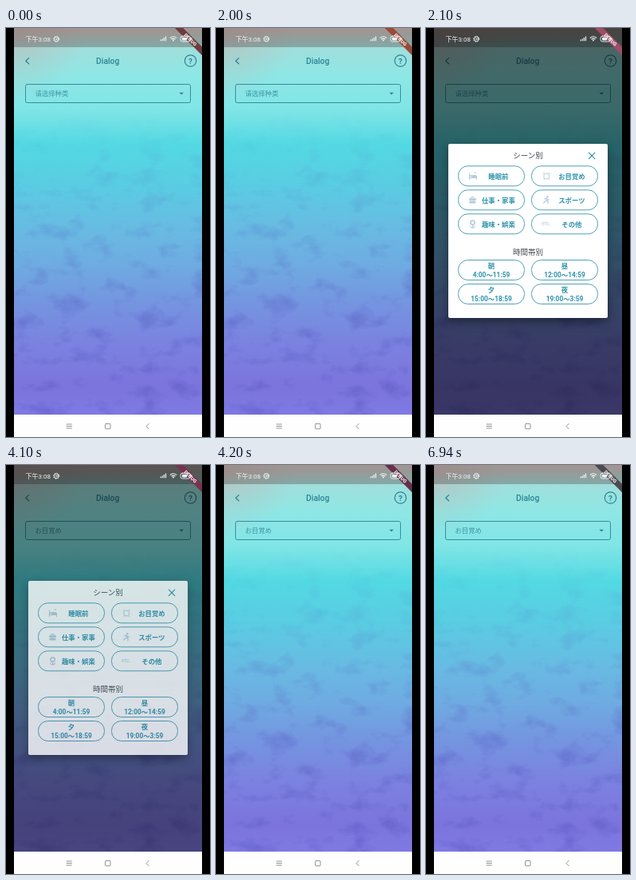
Animation, 256 px wide and 512 px high, one loop 7.7 s. Source, as an HTML page:

```html
<!DOCTYPE html>
<html lang="ja">
<head>
<meta charset="utf-8">
<title>Dialog</title>
<style>
html, body { margin: 0; width: 100%; height: 100%; overflow: hidden; background: #000; }
svg { display: block; width: 100vw; height: 100vh; }
text { font-family: Roboto, "Noto Sans CJK JP", "Noto Sans CJK", sans-serif; text-anchor: middle; }
.zh { font-family: Roboto, "Noto Sans CJK SC", "Noto Sans CJK", sans-serif; }
.start { text-anchor: start; }
.line { fill: none; stroke-linecap: round; stroke-linejoin: round; }
.head { font-size: 9.5px; font-weight: 500; fill: #3f484c; }
.pill { fill: #fff; stroke: #3b97b2; stroke-width: .9; }
.label { font-size: 8.4px; font-weight: 700; fill: #2f93ad; }
.icon { fill: none; stroke: #b3ccd8; stroke-width: 1; }
.icon .solid { fill: #b3ccd8; stroke: none; }
.dialog { filter: drop-shadow(0 5px 6px rgba(0, 0, 0, .38)); }

/* 2000, 2100, 4100, 4200 and 5800 ms of a 7700 ms loop */
.scrim, .dialog, .before, .after, .ribbon { animation: 7.7s step-end infinite; }
.scrim { animation-name: scrim; }
.dialog { animation-name: dialog; }
.before { animation-name: before; }
.after { animation-name: after; }
.ribbon { animation-name: ribbon; }
@keyframes scrim { 0% { opacity: 0 } 27.2727% { opacity: .54 } 53.2468% { opacity: .44 } 54.5455%, 100% { opacity: 0 } }
@keyframes dialog { 0% { opacity: 0 } 27.2727% { opacity: 1 } 53.2468% { opacity: .8 } 54.5455%, 100% { opacity: 0 } }
@keyframes before { 0% { opacity: 1 } 53.2468%, 100% { opacity: 0 } }
@keyframes after { 0% { opacity: 0 } 53.2468%, 100% { opacity: 1 } }
@keyframes ribbon {
  0% { fill: #6c3c3e }
  25.974% { fill: #9a4a38 }
  27.2727% { fill: #a04c66 }
  53.2468% { fill: #78324e }
  54.5455% { fill: #66304a }
  75.3247%, 100% { fill: #4c4a4e }
}
</style>
</head>
<body>
<svg viewBox="0 0 256 512" preserveAspectRatio="none">
  <defs>
    <linearGradient id="sky" gradientUnits="userSpaceOnUse" x1="0" y1="0" x2="0" y2="484">
      <stop offset="0" stop-color="#d2bdb9"/>
      <stop offset=".03" stop-color="#b8ccc9"/>
      <stop offset=".055" stop-color="#9fdfdc"/>
      <stop offset=".12" stop-color="#8ee7e5"/>
      <stop offset=".21" stop-color="#80e5e6"/>
      <stop offset=".3" stop-color="#53d9e3"/>
      <stop offset=".41" stop-color="#5acce2"/>
      <stop offset=".52" stop-color="#68bbe3"/>
      <stop offset=".62" stop-color="#6faae1"/>
      <stop offset=".72" stop-color="#7593e0"/>
      <stop offset=".83" stop-color="#7c80e0"/>
      <stop offset=".93" stop-color="#7b74dc"/>
      <stop offset="1" stop-color="#7f7ae3"/>
    </linearGradient>
    <radialGradient id="blush" gradientUnits="userSpaceOnUse" cx="10" cy="0" r="90">
      <stop offset="0" stop-color="#c9aaa8" stop-opacity=".5"/>
      <stop offset="1" stop-color="#c9aaa8" stop-opacity="0"/>
    </radialGradient>
    <linearGradient id="fade" x1="0" y1="0" x2="0" y2="1">
      <stop offset=".2" stop-color="#000"/>
      <stop offset=".5" stop-color="#888"/>
      <stop offset=".85" stop-color="#fff"/>
    </linearGradient>
    <mask id="low"><rect x="10" width="236" height="484" fill="url(#fade)"/></mask>
    <filter id="blotch" x="0" y="0" width="1" height="1" color-interpolation-filters="sRGB">
      <feTurbulence type="fractalNoise" baseFrequency=".03 .045" numOctaves="4" seed="8"/>
      <feColorMatrix values="0 0 0 0 .3  0 0 0 0 .3  0 0 0 0 .72  3 0 0 0 -1.55"/>
    </filter>
    <clipPath id="screen"><rect x="10" width="236" height="484"/></clipPath>
  </defs>

  <rect width="256" height="512"/>
  <g clip-path="url(#screen)">
    <rect x="10" width="236" height="484" fill="url(#sky)"/>
    <rect x="10" width="120" height="90" fill="url(#blush)"/>
    <g mask="url(#low)" opacity=".34"><rect x="10" width="236" height="484" filter="url(#blotch)"/></g>

    <g stroke="#2e8496" class="line">
      <path d="M28.6 37.6 24.8 41.2 28.6 44.8" stroke-width="1.3"/>
      <circle cx="231.5" cy="41" r="7.2" stroke-width="1.2"/>
      <rect x="24.5" y="70.5" width="207" height="23" rx="2" stroke-width=".9"/>
    </g>
    <g fill="#2e8496">
      <text x="127.7" y="44.7" font-size="10.3" font-weight="500">Dialog</text>
      <text x="231.5" y="44.5" font-size="9.8" font-weight="700">?</text>
      <path d="M217.4 80.8h5.6l-2.8 2.8z"/>
    </g>
    <g fill="#3f94a4" font-size="8.4">
      <text class="zh start before" lang="zh-CN" x="36.4" y="85.4">请选择种类</text>
      <text class="start after" x="36.4" y="85.4">お目覚め</text>
    </g>

    <rect class="scrim" x="10" width="236" height="484" opacity="0"/>
    <rect x="10" width="236" height="24" opacity=".22"/>

    <g class="dialog" opacity="0">
      <rect x="28" y="145" width="200" height="218" rx="2" fill="#fff"/>
      <text class="head" x="128" y="162.6">シーン別</text>
      <text class="head" x="128" y="283.6">時間帯別</text>
      <path class="line" d="m204.4 156.2 7.4 7.4m0-7.4-7.4 7.4" stroke="#2f93ad" stroke-width="1.2"/>
      <g id="pills"></g>
      <g class="icon">
        <g>
          <path d="M54.5 181.5v8.5M54.5 187.6h9v2.4M57.5 185h6v2.5"/>
          <path class="solid" d="M57 184.3h5.5l1.3 3.3H57zM60.5 180.6h2.6v.9h-2.6z"/>
          <circle class="solid" cx="56" cy="185" r="1"/>
        </g>
        <g>
          <circle cx="151.2" cy="185.6" r="3.6"/>
          <path d="m146.8 182.5 1.8-1.7m5.2 0 1.8 1.7M148.6 188.7l-1 1.2m6.2-1.2 1 1.2"/>
        </g>
        <g>
          <path class="solid" d="M54 213.3h8.8v2.4H54zM54.5 216.4h7.8v3.2h-7.8z"/>
          <path d="M56.8 213.2v-1.6h3.2v1.6"/>
        </g>
        <g>
          <circle class="solid" cx="152.4" cy="211.2" r="1.2"/>
          <path d="m148.4 214.2 2.2-1.2 1.2 3-2.2 1.2-2.4 2M151.8 216l1.4 1.6-.4 2.4M151.2 213.4l1.6 1.6 2 .2" stroke-width="1.2"/>
        </g>
        <g>
          <circle cx="58.6" cy="243.6" r="2.6" stroke-width="1.6"/>
          <path d="M58.6 246.2v4M55.4 247.6q1 2.6 3.2 2.6t3.2-2.6" stroke-width="1.2"/>
        </g>
      </g>
      <text x="151" y="247.4" font-size="7.2" fill="#b3ccd8">etc.</text>
    </g>

    <g transform="translate(246 0) rotate(45)">
      <rect class="ribbon" x="-30" y="16.8" width="60" height="7.4" fill="#6c3c3e"/>
      <text y="22.7" font-size="6.1" font-weight="900" fill="#eee">DEBUG</text>
    </g>

    <g fill="#eef3f3">
      <text class="zh start" lang="zh-CN" x="24.6" y="16.8" font-size="8">下午3:08</text>
      <path d="M193.6 14.6h1.2v1.6h-1.2zM195.7 13.4h1.2v2.8h-1.2zM197.8 12h1.2v4.2h-1.2zM199.9 10.4h1.2v5.8h-1.2z"/>
      <circle cx="210" cy="15.6" r="1"/>
      <rect x="221" y="11.8" width="6" height="3.6" rx="1"/>
    </g>
    <g class="line" stroke="#eef3f3">
      <circle cx="63.2" cy="13.8" r="2.9" stroke-width="1"/>
      <circle cx="63.2" cy="13.8" r="3.6" stroke-width="1" stroke-dasharray="1.1 1.73" stroke-linecap="butt"/>
      <circle cx="63.2" cy="13.8" r=".9" stroke-width=".7"/>
      <path d="M206.2 12.2q3.8-3 7.6 0M207.8 14q2.2-1.7 4.4 0" stroke-width="1.1"/>
      <rect x="219" y="10.2" width="12.4" height="6.8" rx="2.4" stroke-width=".9"/>
      <path d="M233 12.6v2" stroke-width="1"/>
    </g>
  </g>

  <rect x="10" y="484" width="236" height="28" fill="#fefefe"/>
  <g class="line" stroke="#858585" stroke-width=".9">
    <path d="M76 496h6.4M76 498.5h6.4M76 501h6.4"/>
    <rect x="124.6" y="495.4" width="6.4" height="6.4" rx=".8"/>
    <path d="m179.2 495.4-3.2 3.2 3.2 3.2"/>
  </g>
</svg>
<script>
const pills = document.getElementById("pills");

function add(tag, attrs, text = "") {
  const el = document.createElementNS(pills.namespaceURI, tag);
  for (const key in attrs) el.setAttribute(key, attrs[key]);
  el.textContent = text;
  pills.append(el);
}

const label = (x, y, text) => add("text", { class: "label", x, y }, text);
const pill = (i, top) => {
  const x = 40.5 + (i % 2) * 92;
  const y = top + Math.floor(i / 2) * 30;
  add("rect", { class: "pill", x, y, width: 83, height: 25, rx: 12 });
  return [x, y];
};

["睡眠前", "お目覚め", "仕事・家事", "スポーツ", "趣味・娯楽", "その他"].forEach((name, i) => {
  const [x, y] = pill(i, 172.8);
  label(x + 50.4, y + 15.8, name);
});

[["朝", "4:00〜11:59"], ["昼", "12:00〜14:59"], ["夕", "15:00〜18:59"], ["夜", "19:00〜3:59"]].forEach(([name, hours], i) => {
  const [x, y] = pill(i, 290.5);
  label(x + 41.5, y + 10, name);
  label(x + 41.5, y + 21.8, hours);
});
</script>
</body>
</html>
```
